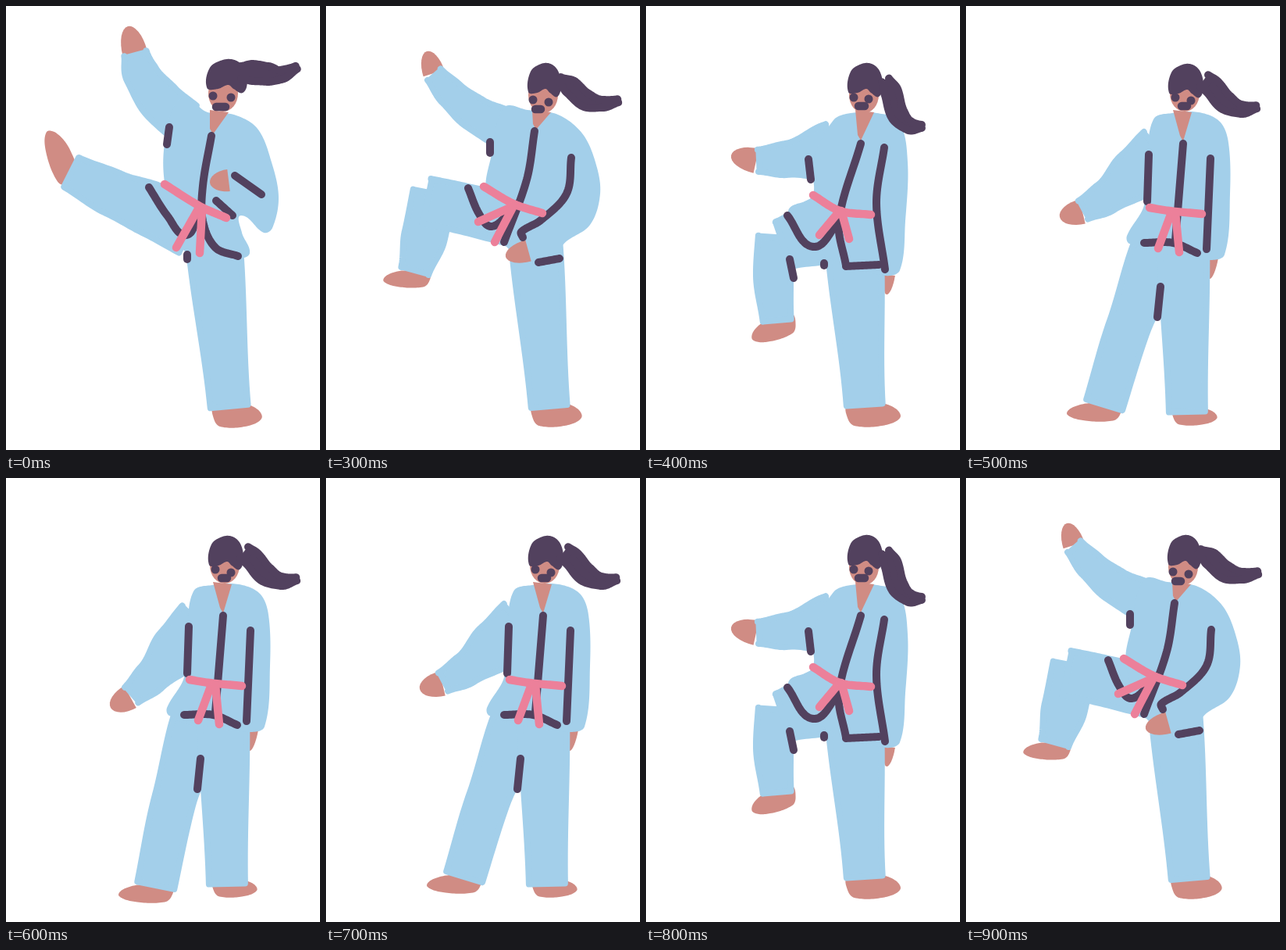
An HTML page with a canvas that plays this animation: 402x568 px, repeating every 1 s.

```html
<!DOCTYPE html>
<html lang="en">
<head>
<meta charset="utf-8">
<title>Front kick</title>
<style>
html, body { margin: 0; width: 100%; height: 100%; overflow: hidden; background: #fff; }
canvas { display: block; }
</style>
</head>
<body>
<canvas id="stage" width="402" height="568"></canvas>
<script>
const ctx = document.getElementById('stage').getContext('2d');
const GI = '#a3cfea', SKIN = '#d08c84', DARK = '#52415e', PINK = '#ec809a';
const FOOT = [-20, -4, -20, 12, -12, 22, 20, 22, 41, 12, 36, 0, 14, -8];
const CAP = [-21, 13, -18, -13, -4, -23, 9, -23, 19, -14, 23, 4, 18, 19, 8, 14, 2, 9, -9, 14];

// limbs and tail: x, y, half width per joint
// hands: wrist x, y, tip x, y, half width; feet: x, y, angle, scale x, scale y
// head: x, y, hair width; neck: x, then the tip of the collar
const kick = {
  hands: [[165, 60, 156, 26, 16]],
  feet: [[81, 203, 1.19, -1.2, 1], [286, 516, 0, 1, 1]],
  limbs: [
    [165, 59, 18.5, 173, 87, 24, 198, 122, 29, 229, 149, 30],
    [80, 211, 25, 138, 240, 31, 188, 261, 36, 240, 288, 37],
    [266, 300, 37, 286, 516, 28]
  ],
  torso: [225, 118, 258, 136, 292, 139, 322, 157, 340, 200, 349, 245, 341, 284, 330, 290, 301, 268,
    302, 290, 312, 316, 298, 323, 230, 315, 204, 232, 204, 170],
  neck: [273, 265, 164], fist: [285, 223, 261, 226, 14],
  head: [282, 92, 1.17], face: [278, 112], eyes: [265, 115, 288, 117], mouth: [269, 129, 281, 129],
  tail: [300, 85, 13, 316, 85, 16, 335, 87, 15, 352, 88, 11, 373, 78, 7],
  trim: [
    [263, 166, 252, 230, 252, 275, 268, 309, 297, 320],
    [209, 155, 206, 177],
    [293, 217, 327, 241],
    [269, 249, 290, 268],
    [183, 232, 207, 269, 231, 293, 246, 262],
    [232, 318, 232, 324]
  ],
  belt: [[203, 228, 248, 256, 282, 271], [247, 258, 218, 309], [251, 260, 248, 316]]
};

const chamber = {
  hands: [[138, 86, 129, 58, 14]],
  feet: [[113, 344, 0, -.95, .7], [285, 515, 0, 1.02, 1]],
  limbs: [
    [137, 86, 15, 160, 112, 20, 190, 137, 24, 230, 158, 28],
    [113, 342, 22, 126, 295, 30, 138, 236, 30],
    [126, 249, 33, 170, 258, 33, 245, 276, 34],
    [268, 300, 35, 286, 516, 27]
  ],
  torso: [228, 130, 258, 133, 297, 139, 328, 163, 345, 200, 351, 240, 338, 280, 303, 306, 300, 330,
    235, 312, 205, 240, 212, 190],
  neck: [276, 269, 158], fist: [259, 313, 230, 321, 14],
  head: [279, 97, .95], face: [278, 114], eyes: [265, 120, 285, 123], mouth: [268, 132, 275, 132],
  tail: [298, 93, 8, 314, 104, 14, 332, 120, 14, 354, 125, 10, 375, 121, 7],
  trim: [
    [267, 160, 257, 222, 228, 302],
    [210, 174, 210, 188],
    [314, 194, 308, 240, 275, 274, 250, 289, 252, 296],
    [182, 233, 196, 266, 212, 282, 237, 262],
    [272, 328, 299, 323]
  ],
  belt: [[202, 231, 240, 253, 277, 265], [240, 256, 195, 276], [240, 256, 216, 302]]
};

const lift = {
  hands: [[141, 198, 109, 191, 16], [312, 344, 308, 369, 7]],
  feet: [[170, 404, -.35, -.95, .9], [280, 515, 0, 1.1, 1]],
  limbs: [
    [141, 198, 18, 180, 196, 24, 240, 186, 40],
    [168, 406, 22, 163, 345, 26, 166, 292, 26],
    [172, 306, 34, 230, 286, 44],
    [266, 300, 38, 280, 514, 27]
  ],
  torso: [240, 146, 262, 137, 296, 137, 324, 148, 335, 200, 332, 275, 325, 338, 306, 345, 250, 330,
    200, 300, 182, 262, 213, 243, 213, 200],
  neck: [280, 275, 172],
  head: [280, 97, 1], face: [279, 114], eyes: [266, 117, 285, 119], mouth: [272, 128, 280, 128],
  tail: [306, 94, 10, 314, 110, 14, 322, 138, 14, 337, 153, 11, 354, 154, 7],
  trim: [
    [275, 176, 247, 275, 256, 332],
    [256, 333, 298, 331],
    [208, 196, 211, 222],
    [305, 181, 295, 252, 306, 337],
    [181, 268, 214, 308, 247, 275],
    [184, 324, 189, 348],
    [228, 329, 228, 332]
  ],
  belt: [[214, 242, 248, 262, 288, 267], [248, 262, 222, 293], [250, 262, 260, 298]]
};

const stand = {
  hands: [[149, 263, 120, 270, 16], [317, 322, 312, 349, 6]],
  feet: [[175, 514, 0, -1.1, .75], [284, 519, 0, .9, .75]],
  limbs: [
    [148, 262, 17, 179, 245, 23, 218, 214, 34, 252, 185, 38],
    [176, 514, 28, 208, 410, 29, 248, 312, 38],
    [278, 300, 34, 283, 523, 27]
  ],
  torso: [240, 145, 264, 137, 298, 136, 325, 148, 336, 175, 338, 240, 331, 318, 311, 325, 260, 318,
    209, 304, 206, 294, 228, 255, 232, 200],
  neck: [277, 278, 173],
  head: [281, 98, 1], face: [280, 112], eyes: [268, 117, 288, 121], mouth: [276, 128, 283, 128],
  tail: [304, 95, 14, 316, 104, 15, 331, 122, 15, 352, 132, 11, 373, 129, 7],
  trim: [
    [278, 176, 268, 300],
    [234, 190, 232, 250],
    [313, 195, 308, 311],
    [228, 303, 265, 303, 296, 316],
    [249, 359, 245, 398]
  ],
  belt: [[235, 258, 260, 262, 302, 266], [263, 264, 246, 310], [268, 264, 273, 315]]
};

// Lowest point of the swing: front arm down, front foot drawn in.
const low = {
  ...stand,
  hands: [[159, 280, 134, 294, 16], stand.hands[1]],
  feet: [[190, 526, 0, -1.1, .75], stand.feet[1]],
  limbs: [
    [159, 279, 17, 186, 255, 23, 220, 218, 34, 252, 185, 38],
    [191, 525, 28, 215, 412, 29, 248, 312, 38],
    stand.limbs[2]
  ]
};

// Samples a smooth curve through the points; a third value is blended.
function curve(list, size, closed) {
  const n = list.length / size, out = [];
  const at = i => {
    const k = closed ? (i + n) % n : Math.max(0, Math.min(n - 1, i));
    return list.slice(k * size, (k + 1) * size);
  };
  const dir = i => {
    const a = at(i - 1), b = at(i + 1), d = Math.hypot(b[0] - a[0], b[1] - a[1]) || 1;
    return [(b[0] - a[0]) / d, (b[1] - a[1]) / d];
  };
  const last = closed ? n : n - 1;
  for (let i = 0; i < last; i++) {
    const p = at(i), q = at(i + 1), u = dir(i), v = dir(i + 1);
    const len = Math.hypot(q[0] - p[0], q[1] - p[1]);
    for (let s = 0; s <= 1; s += 1 / 16) {
      const e = s * s * (3 - 2 * s), a = s * (1 - s) * (1 - s) * len, b = s * s * (s - 1) * len;
      out.push(p.map((c, k) => c + (q[k] - c) * e + (k < 2 ? u[k] * a + v[k] * b : 0)));
    }
  }
  return out;
}

function path(points) {
  ctx.beginPath();
  points.forEach(p => ctx.lineTo(p[0], p[1]));
}

function blob(list, color) {
  path(curve(list, 2, true));
  ctx.fillStyle = color;
  ctx.fill();
}

function line(list, color, width) {
  path(curve(list, 2, false));
  ctx.strokeStyle = color;
  ctx.lineWidth = width;
  ctx.stroke();
}

// A tapered limb with slightly rounded ends.
function tube(list, color, round = 4) {
  const c = curve(list, 3, false), left = [], right = [];
  c.forEach(([x, y, r], i) => {
    const a = c[Math.max(0, i - 2)], b = c[Math.min(c.length - 1, i + 2)];
    const t = Math.atan2(b[1] - a[1], b[0] - a[0]), h = r - round;
    const inset = i === 0 ? round : i === c.length - 1 ? -round : 0;
    const px = x + Math.cos(t) * inset, py = y + Math.sin(t) * inset;
    left.push([px + Math.sin(t) * h, py - Math.cos(t) * h]);
    right.unshift([px - Math.sin(t) * h, py + Math.cos(t) * h]);
  });
  path([...left, ...right]);
  ctx.closePath();
  ctx.fillStyle = ctx.strokeStyle = color;
  ctx.lineWidth = round * 2;
  ctx.fill();
  ctx.stroke();
}

function hand([x, y, tx, ty, w]) {
  ctx.beginPath();
  ctx.ellipse(x, y, Math.hypot(tx - x, ty - y), w, Math.atan2(ty - y, tx - x), -Math.PI / 2, Math.PI / 2);
  ctx.fillStyle = SKIN;
  ctx.fill();
}

function stamp(shape, color, x, y, angle, sx, sy) {
  ctx.save();
  ctx.translate(x, y);
  ctx.rotate(angle);
  ctx.scale(sx, sy);
  blob(shape, color);
  ctx.restore();
}

function oval(x, y, rx, ry, color) {
  ctx.beginPath();
  ctx.ellipse(x, y, rx, ry, 0, 0, 7);
  ctx.fillStyle = color;
  ctx.fill();
}

function drawHead(p) {
  const [nx, tx, ty] = p.neck;
  path([[nx - 12, 133], [nx + 12, 136], [tx, ty], [tx - 4, ty - 7]]);
  ctx.fillStyle = SKIN;
  ctx.fill();
  oval(...p.face, 19, 23, SKIN);
  const [x, y, w] = p.head;
  stamp(CAP, DARK, x, y, 0, w, 1);
  tube(p.tail, DARK, 5);
  const [ax, ay, bx, by] = p.eyes;
  oval(ax, ay, 5.5, 5.5, DARK);
  oval(bx, by, 5.5, 5.5, DARK);
  line(p.mouth, DARK, 10.5);
}

function draw(p) {
  ctx.fillStyle = '#fff';
  ctx.fillRect(0, 0, 402, 568);
  ctx.lineCap = ctx.lineJoin = 'round';
  p.hands.forEach(hand);
  p.feet.forEach(f => stamp(FOOT, SKIN, ...f));
  p.limbs.forEach(l => tube(l, GI));
  blob(p.torso, GI);
  if (p.fist) hand(p.fist);
  drawHead(p);
  p.trim.forEach(s => line(s, DARK, 10));
  p.belt.forEach(s => line(s, PINK, 10.5));
}

const steps = [kick, kick, kick, chamber, lift, stand, low, stand, lift, chamber];
const start = performance.now();
function tick() {
  const t = (performance.now() - start) % 1000;
  draw(steps[Math.floor(t / 100)]);
  requestAnimationFrame(tick);
}
tick();
</script>
</body>
</html>
```
